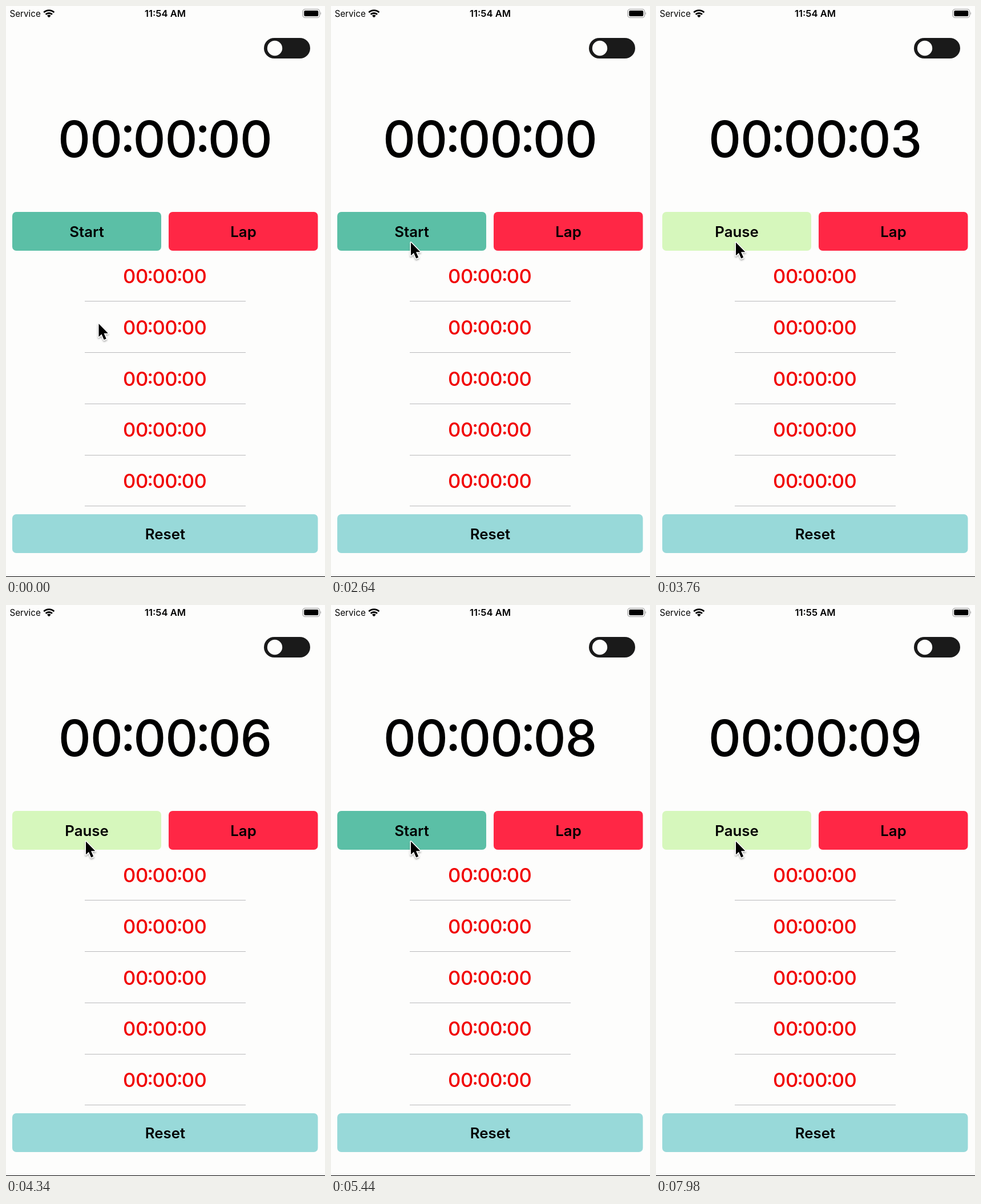
These frames come from a looping animation (559 px wide and 1001 px high, 8000 ms). An HTML page:

```html
<!DOCTYPE html>
<html lang="en">
<head>
<meta charset="utf-8">
<title>Stopwatch</title>
<style>
  html, body { margin: 0; width: 100%; height: 100%; overflow: hidden; background: #fdfdfc; }
  svg { display: block; width: 100%; height: 100%; }
  text { font-family: Inter, "Liberation Sans", sans-serif; font-weight: 600; text-anchor: middle; }
  .digits { font-weight: 550; font-feature-settings: "calt" 0; letter-spacing: -.012em; }
  .big { font-size: 88.5px; }
  .lap { font-size: 34.6px; fill: #f10404; }
  .label { font-size: 25.8px; }
  .clock { font-size: 16.6px; }
  .network { font-size: 15.2px; font-weight: 400; text-anchor: start; }
</style>
</head>
<body>
<svg viewBox="0 0 559 1001" preserveAspectRatio="none">
  <defs>
    <filter id="shadow" x="-50%" y="-50%" width="200%" height="200%">
      <feDropShadow dx="0" dy="2" stdDeviation="1.6" flood-opacity=".35"/>
    </filter>
  </defs>
  <rect width="559" height="1001" fill="#fdfdfc"/>

  <!-- status bar -->
  <text class="network" x="6.5" y="19">Service</text>
  <g fill="none" stroke="#000" stroke-width="2.9">
    <path d="M66.3 11.2A13.2 13.2 0 0 1 84.3 11.2"/>
    <path d="M69.6 14.8A8.2 8.2 0 0 1 81 14.8"/>
  </g>
  <path d="M75.3 20.2L72 16.9A4.7 4.7 0 0 1 78.6 16.9Z"/>
  <text class="clock" id="clock" x="279" y="19"></text>
  <rect x="520" y="5.7" width="29.6" height="14.6" rx="4" fill="none" stroke="#a5a5a5" stroke-width="1.3"/>
  <rect x="522.3" y="8" width="25" height="10" rx="2"/>
  <path d="M551 10.5Q553.2 13 551 15.5Z" fill="#a5a5a5"/>

  <!-- theme switch -->
  <rect x="452" y="56" width="81" height="36" rx="18" fill="#1a1a1a"/>
  <circle cx="471" cy="74" r="13.2" fill="#fdfdfc"/>

  <text class="digits big" id="timer" x="278.5" y="264.6"></text>

  <rect id="toggle" x="11" y="361" width="261" height="68" rx="7"/>
  <text class="label" id="toggleLabel" x="141.5" y="404.5"></text>
  <rect x="285" y="361" width="261.5" height="68" rx="7" fill="#ff2745"/>
  <text class="label" x="416" y="404.5">Lap</text>

  <g id="laps"></g>

  <rect x="11" y="891" width="535.5" height="68" rx="7" fill="#98d9d9"/>
  <text class="label" x="279" y="934.8">Reset</text>
  <rect y="1000" width="559" height="1"/>

  <g id="cursor" filter="url(#shadow)">
    <path d="M0 0V23L5 18.2L9.2 28L13.2 26.3L9 16.8H16.3Z"
      stroke="#fff" stroke-width="3" stroke-linejoin="round" paint-order="stroke"/>
  </g>
</svg>
<script>
  const LOOP = 8000;
  const TICK = 250;
  const START = 2800, PAUSE = 5030, RESUME = 7650;
  const MINUTE = 7000;

  const byId = id => document.getElementById(id);
  const [clock, timer, toggle, toggleLabel, cursor] =
    ["clock", "timer", "toggle", "toggleLabel", "cursor"].map(byId);

  const clamp = v => Math.min(1, Math.max(0, v));
  const ease = v => v * v * (3 - 2 * v);
  const progress = (t, from, to) => ease(clamp((t - from) / (to - from)));

  // Colons sit tight and centred on the digit height.
  const formatTime = seconds => {
    const pairs = [0, 0, seconds].map(n => String(n).padStart(2, "0"));
    return pairs[0] + pairs.slice(1).map(pair =>
      `<tspan dx="-.037em" dy="-.11em">:</tspan><tspan dx="-.037em" dy=".11em">${pair}</tspan>`
    ).join("");
  };

  byId("laps").innerHTML = Array.from({ length: 5 }, (_, i) => {
    const y = 486 + i * 89.75;
    const lineY = Math.round(517.4 + i * 89.75);
    return `<text class="digits lap" x="278.3" y="${y}">${formatTime(0)}</text>
      <rect x="138" y="${lineY}" width="282" height="1" fill="#b9b9bb"/>`;
  }).join("");

  function secondsAt(t) {
    const firstRun = Math.max(0, Math.min(t, PAUSE) - START);
    const secondRun = Math.max(0, t - RESUME);
    return Math.floor(firstRun / TICK) + Math.floor(secondRun / TICK);
  }

  let shown = -1;
  function render(t) {
    const seconds = secondsAt(t);
    if (seconds !== shown) timer.innerHTML = formatTime(shown = seconds);

    const running = (t >= START && t < PAUSE) || t >= RESUME;
    toggle.setAttribute("fill", running ? "#d6f7bc" : "#5bbfa6");
    toggleLabel.textContent = running ? "Pause" : "Start";
    clock.textContent = t < MINUTE ? "11:54 AM" : "11:55 AM";

    const move = progress(t, 20, 820);
    const settle = progress(t, 1000, 1560);
    const x = 162.5 - 21.5 * move - settle;
    const y = 557 - 141.5 * move - settle;
    cursor.setAttribute("transform", `translate(${x} ${y})`);
  }

  const origin = performance.now();
  function loop() {
    render((performance.now() - origin) % LOOP);
    requestAnimationFrame(loop);
  }
  render(0);
  requestAnimationFrame(loop);
</script>
</body>
</html>
```
